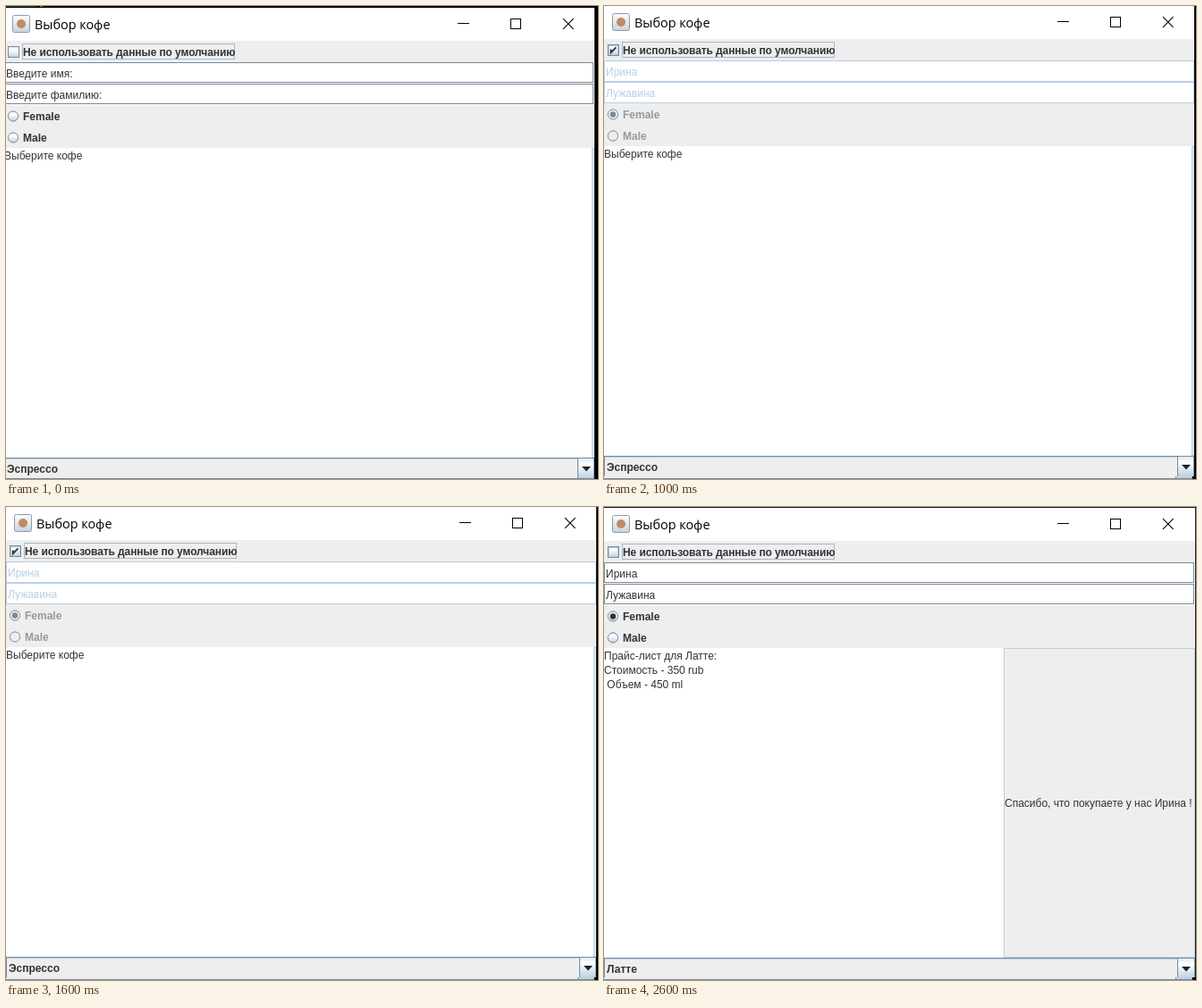
These frames come from a looping animation (662 px wide and 530 px high, 3 s). An HTML page:

```html
<!DOCTYPE html>
<html lang="ru">
<head>
<meta charset="utf-8">
<title>Выбор кофе</title>
<style>
  html, body { margin: 0; width: 100%; height: 100%; overflow: hidden; background: #000; }
  svg { display: block; width: 662px; height: 530px; }
  text { font: 12px "Liberation Sans", Arial, sans-serif; fill: #333; white-space: pre; }
  .bold { font-weight: bold; }
  .long { letter-spacing: -0.09px; }
  .title { font: 14.4px "Open Sans", "Noto Sans", sans-serif; fill: #000; }
</style>
</head>
<body>
<svg id="stage" viewBox="0 0 662 530" xmlns="http://www.w3.org/2000/svg">
  <defs>
    <linearGradient id="ocean" x1="0" y1="0" x2="0" y2="1">
      <stop offset="0" stop-color="#dde8f3"/>
      <stop offset=".3" stop-color="#fff"/>
      <stop offset="1" stop-color="#b8cfe5"/>
    </linearGradient>
    <linearGradient id="badge" x1="0" y1="0" x2="0" y2="1">
      <stop offset="0" stop-color="#fdfdfd"/>
      <stop offset="1" stop-color="#c9d3dc"/>
    </linearGradient>
    <clipPath id="clip1"><rect width="660" height="527"/></clipPath>
    <clipPath id="clip2"><rect width="662" height="527"/></clipPath>
  </defs>
</svg>
<script>
const NS = 'http://www.w3.org/2000/svg';
const stage = document.getElementById('stage');
const LINE = '#7a8a99', PALE = '#b8cfe5', PANEL = '#eee', OCEAN = 'url(#ocean)';

const NAME = 'Ирина', SURNAME = 'Лужавина';

const states = [
  { x: -2, y: 0, w: 660, name: 'Введите имя:', surname: 'Введите фамилию:',
    lines: ['Выберите кофе'], coffee: 'Эспрессо' },
  { x: 0, y: -2, w: 660, name: NAME, surname: SURNAME, checked: true, hover: true,
    female: true, disabled: true, lines: ['Выберите кофе'], coffee: 'Эспрессо' },
  { x: 0, y: -1, w: 661, name: NAME, surname: SURNAME, hover: true, female: true,
    lines: ['Прайс-лист для Латте:', 'Стоимость - 350 rub', ' Объем - 450 ml'],
    thanks: `Спасибо, что покупаете у нас ${NAME} !`, coffee: 'Латте' }
];

function add(parent, tag, attrs, content) {
  const el = document.createElementNS(NS, tag);
  for (const key in attrs) el.setAttribute(key, attrs[key]);
  if (content) el.textContent = content;
  return parent.appendChild(el);
}

function painter(g) {
  return {
    fill: (x, y, width, height, fill) => add(g, 'rect', { x, y, width, height, fill }),
    box: (x, y, w, h, stroke, fill = 'none', rx = 0) =>
      add(g, 'rect', { x: x + .5, y: y + .5, width: w - 1, height: h - 1, rx, stroke, fill }),
    dot: (cx, cy, r, fill, stroke = 'none') => add(g, 'circle', { cx, cy, r, fill, stroke }),
    path: (d, attrs) => add(g, 'path', { d, fill: 'none', ...attrs }),
    text: (x, y, str, cls = '', color = '') =>
      add(g, 'text', { x, y, class: cls, style: color && `fill:${color}` }, str)
  };
}

function titleBar(p, w) {
  p.fill(0, 2, w, 37, '#fff');
  p.box(9, 10, 20, 20, '#8d9aa6', 'url(#badge)', 2);
  p.dot(19, 20, 5, '#c08a66');
  p.text(34, 26, 'Выбор кофе', 'title');
  p.fill(507, 19, 13, 1, '#000');
  p.box(566, 14, 12, 12, '#000');
  p.path('M625 14.2 636.6 25.8M636.6 14.2 625 25.8', { stroke: '#000', 'stroke-width': 1.1 });
}

function checkBox(p, s) {
  p.box(4, 45, 13, 13, LINE, OCEAN);
  if (s.hover) p.box(5, 46, 11, 11, PALE);
  if (s.checked) p.path('M7.8 50.5V54.2L13.5 48.3', { stroke: '#333', 'stroke-width': 1.9 });
  p.box(20, 42, 238, 18, '#a3b8cc');
  p.text(21, 56, 'Не использовать данные по умолчанию', 'bold long');
}

function field(p, s, y, str) {
  p.fill(0, y, s.w, 24, '#fff');
  if (s.disabled) p.box(0, y, s.w, 24, PALE);
  else p.box(0, y, s.w - 1, 23, LINE);
  p.text(2, y + 17, str, '', s.disabled ? PALE : '');
}

function radio(p, s, y, label, on) {
  const cy = y + 12.5;
  p.dot(10, cy, 5.6, s.disabled ? PANEL : OCEAN, LINE);
  if (on) p.dot(10, cy, 3.2, s.disabled ? '#7a8a99' : '#333');
  p.text(21, y + 17, label, 'bold', s.disabled ? '#999' : '');
}

function combo(p, s) {
  p.fill(0, 506, s.w, 24, PANEL);
  p.box(0, 506, s.w, 24, LINE);
  p.fill(1, 507, s.w - 2, 1, PALE);
  p.box(641, 506, s.w - 641, 24, LINE, OCEAN);
  p.path('M646 516H656L651 521.5Z', { fill: '#222' });
  p.text(3, 523, s.coffee, 'bold');
}

function drawWindow(s, i) {
  const clip = add(stage, 'g', i ? { 'clip-path': `url(#clip${i})` } : {});
  if (i) painter(clip).fill(0, 0, 662, 527, '#1c1c1c');
  const p = painter(add(clip, 'g', { transform: `translate(${s.x} ${s.y})` }));
  titleBar(p, s.w);
  p.fill(0, 39, s.w, 467, PANEL);
  checkBox(p, s);
  field(p, s, 63, s.name);
  field(p, s, 87, s.surname);
  radio(p, s, 111, 'Female', s.female);
  radio(p, s, 135, 'Male', false);

  const split = s.thanks ? 447 : 657;
  p.fill(0, 159, split, 347, '#fff');
  p.box(split, 159, s.w - split, 347, PALE, PANEL);
  s.lines.forEach((line, n) => p.text(0, 172 + 16 * n, line));
  if (s.thanks) p.text(448, 337, s.thanks);
  combo(p, s);
  return clip;
}

// Desktop sliver above the first window position
const desk = painter(stage);
desk.fill(0, 0, 662, 530, '#000');
desk.fill(0, 0, 34, 1, '#24402c');
desk.fill(38, 0, 3, 1, '#8a8a3a');

const layers = states.map(drawWindow);

function tick(now) {
  const step = Math.floor(now / 1000) % 3;
  layers.forEach((g, i) => { g.style.display = i === 0 || i === step ? '' : 'none'; });
  requestAnimationFrame(t => tick(Math.max(0, t - start)));
}
const start = performance.now();
tick(0);
</script>
</body>
</html>
```
